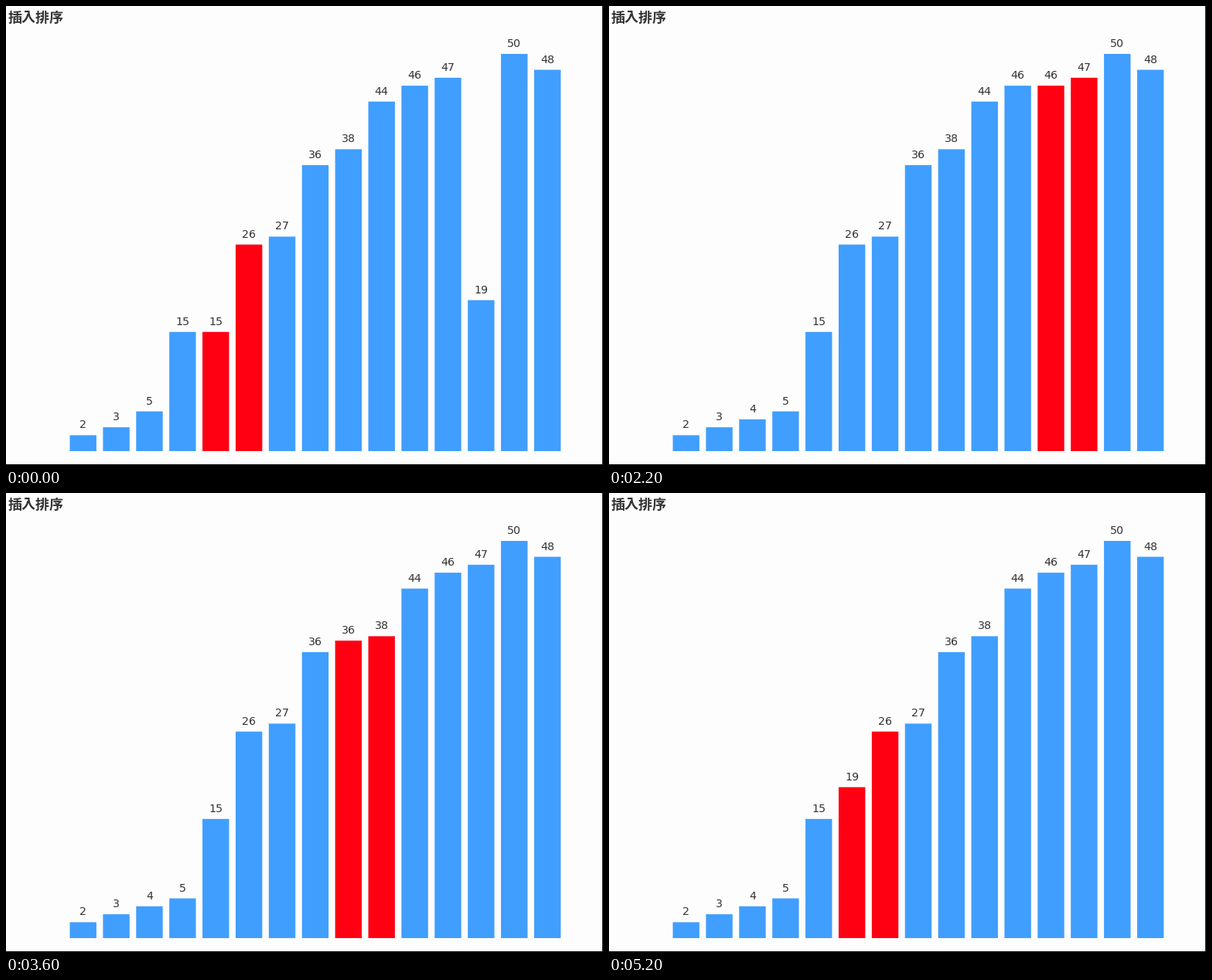
Recreate the animation shown at these times as a matplotlib script. Size 772 by 594 pixels, loop 5.6 s.

```python
import matplotlib.pyplot as plt
from matplotlib.animation import FuncAnimation
from matplotlib.patches import Rectangle

W, H, DPI = 772, 594, 64
TICK, TICKS = 200, 28
BASE, UNIT = 576, 10.28
LEFT, PITCH, BAR_W = 82.5, 42.89, 34.4
PAPER, BLUE, RED, INK = "#fdfdfd", "#409eff", "#ff0012", "#333333"

# Picture at the loop's start: 4 is halfway through its insertion.
START = [2, 3, 5, 15, 15, 26, 27, 36, 38, 44, 46, 47, 19, 50, 48]
START_RED = (5, 4)
PENDING = [(3, 4), (12, 19)]  # (open slot, value to insert)

# Timing in ms
FIRST, SHIFT, PLACE, NEXT = 450, 498.6, 400, 745.4
TWEEN = 100


def px(size):
    return size * 72 / DPI


def sort_writes():
    """Yield (time, index, value) for every write of the insertion sort."""
    values, now = list(START), FIRST
    for slot, key in PENDING:
        while values[slot - 1] > key:
            values[slot] = values[slot - 1]
            yield now, slot, values[slot]
            slot -= 1
            now += SHIFT if values[slot - 1] > key else PLACE
        values[slot] = key
        yield now, slot, key
        now += NEXT


WRITES = list(sort_writes())


def ease_out(t):
    return 1 - (1 - min(t, 1)) ** 3


def state(now):
    """Values, bar heights and the two highlighted indices at a time."""
    values, heights, red = list(START), list(START), START_RED
    for when, i, value in WRITES:
        if when > now:
            break
        heights[i] += (value - heights[i]) * ease_out((now - when) / TWEEN)
        values[i] = value
        red = (red[1], i)
    return values, heights, red


fig = plt.figure(figsize=(W / DPI, H / DPI), dpi=DPI, facecolor=PAPER)
ax = fig.add_axes([0, 0, 1, 1])
ax.set_xlim(0, W)
ax.set_ylim(H, 0)
ax.axis("off")

ax.text(2.7, 21, "插入排序", family="Noto Sans CJK JP", weight="bold",
        size=px(18), color=INK, va="baseline")
ax.add_patch(Rectangle((W - 1, 0), 1, H, color="#111111", lw=0))
ax.add_patch(Rectangle((0, H - 1), W, 1, color="#111111", lw=0))

bars, labels = [], []
for n in range(len(START)):
    x = LEFT + n * PITCH
    bars.append(ax.add_patch(Rectangle((x, BASE), BAR_W, 0, lw=0, snap=False)))
    labels.append(ax.text(x + BAR_W / 2, BASE, "", family="DejaVu Sans",
                          size=px(14.3), color=INK, ha="center", va="baseline"))


def draw(tick):
    values, heights, red = state(tick * TICK)
    for n, (bar, label) in enumerate(zip(bars, labels)):
        top = BASE - heights[n] * UNIT
        bar.set_y(top)
        bar.set_height(BASE - top)
        bar.set_facecolor(RED if n in red else BLUE)
        label.set_y(top - 9)
        label.set_text(str(values[n]))
    return bars + labels


anim = FuncAnimation(fig, draw, frames=TICKS, interval=TICK, repeat=True,
                     repeat_delay=0, blit=False)
plt.show()
```
